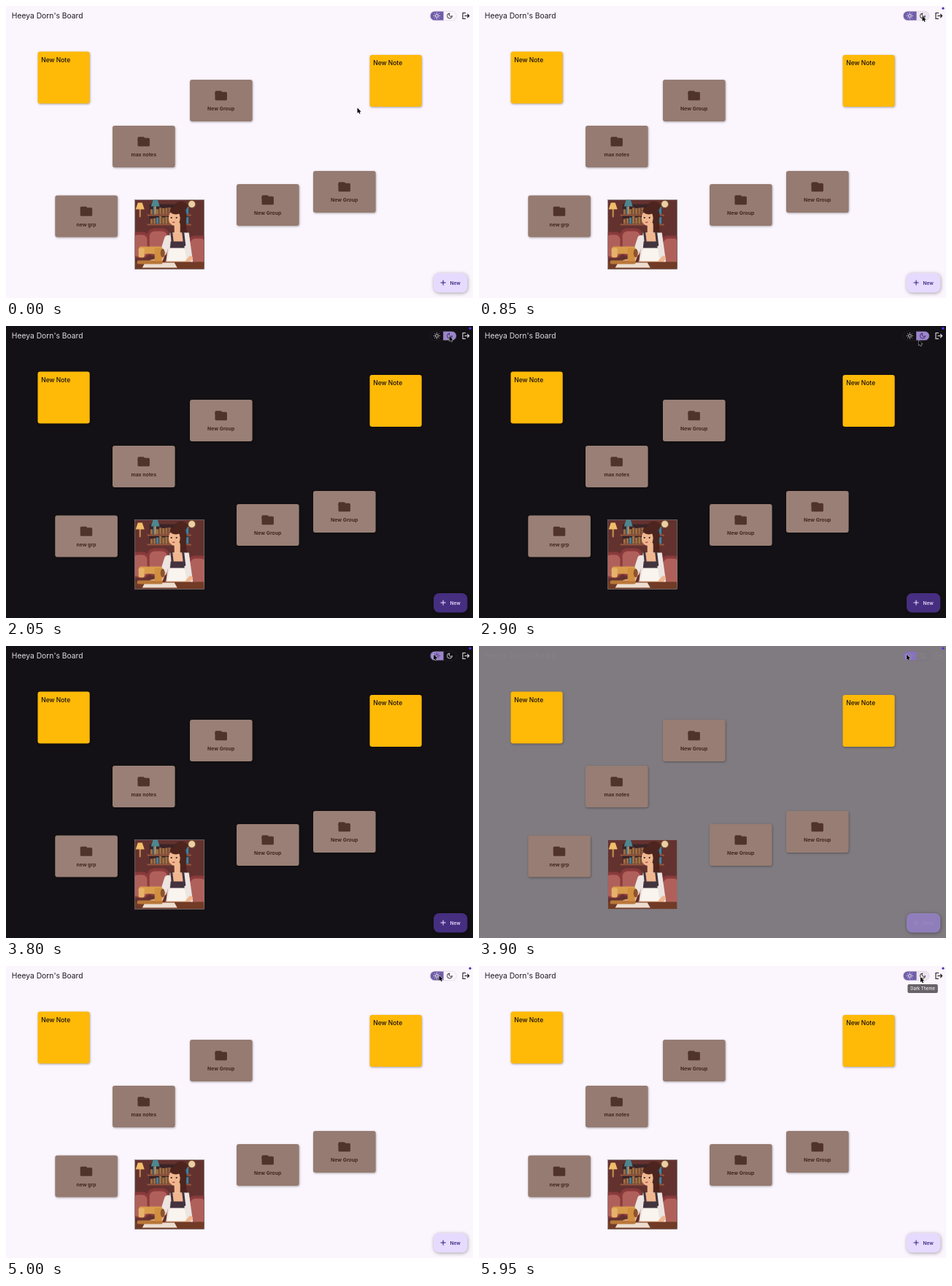
Recreate the animation shown at these times as an HTML page with a canvas. Size 640x400 px, loop 6350 ms.

```html
<!DOCTYPE html>
<html lang="en">
<head>
<meta charset="utf-8">
<title>Notes board</title>
<style>
html, body { margin: 0; width: 100%; height: 100%; overflow: hidden; background: #fbf5fd; }
canvas { display: block; width: 640px; height: 400px; }
</style>
</head>
<body>
<canvas id="stage"></canvas>
<script>
const LOOP = 6350;
const FONT = 'Inter, Roboto, sans-serif';
const canvas = document.getElementById('stage');
const dpr = window.devicePixelRatio || 1;
canvas.width = 640 * dpr;
canvas.height = 400 * dpr;
const ctx = canvas.getContext('2d');

// light and dark value of every themed colour
const THEME = {
  bg: ['#fbf5fd', '#131115'],
  text: ['#1d1b20', '#e0dbe0'],
  card: ['#957b71', '#997f75'],
  fab: ['#e6dbff', '#462e80'],
  fabText: ['#3c2c82', '#e4d7fa'],
  pick: ['#705daa', '#a08ad4'],
  onPick: ['#ffffff', '#342060'],
  line: ['#dad1e1', '#26232a'],
  frame: ['#6e6970', '#918c92'],
  dot: ['#4c34aa', '#483afa']
};
const GROUPS = [
  [252, 101, 'New Group'], [146, 164, 'max notes'], [421, 226, 'New Group'],
  [316, 244, 'New Group'], [67.3, 259.5, 'new grp']
];
const NOTES = [[43.5, 62.5], [498.5, 67]];

// pointer moves: start time, end time, goal
const HOME = [481.5, 139.5];
const MOVES = [
  [450, 850, 607.5, 13.5], [2450, 3100, 601, 21],
  [3100, 3400, 586, 11.7], [4700, 5400, 605, 15]
];

const clamp = v => Math.max(0, Math.min(1, v));
const ease = v => v * v * (3 - 2 * v);
const ramp = (t, start, length) => clamp((t - start) / length);
const mix = (a, b, k) => a + (b - a) * k;
const rnd = i => Math.abs(Math.sin(i * 12.9898) * 43758.5453) % 1;
const darkness = t => ramp(t, 1808, 200) - ramp(t, 3808, 200);

function mixHex(a, b, k) {
  const part = (hex, i) => parseInt(hex.slice(i, i + 2), 16);
  return `rgb(${[1, 3, 5].map(i => Math.round(mix(part(a, i), part(b, i), k)))})`;
}

function palette(k) {
  const out = {};
  for (const name in THEME) out[name] = mixHex(...THEME[name], k);
  return out;
}

function pointer(t) {
  let [x, y] = HOME;
  for (const [from, to, gx, gy] of MOVES) {
    const k = ease(ramp(t, from, to - from));
    x = mix(x, gx, k);
    y = mix(y, gy, k);
  }
  return [x, y];
}

function box(x, y, w, h, r, color) {
  ctx.fillStyle = color;
  ctx.beginPath();
  ctx.roundRect(x, y, w, h, r);
  ctx.fill();
}

function raised(x, y, w, h, r, color, blur) {
  ctx.save();
  ctx.shadowColor = 'rgba(0,0,0,.34)';
  ctx.shadowBlur = blur * dpr;
  ctx.shadowOffsetX = 0.6 * dpr;
  ctx.shadowOffsetY = dpr;
  box(x, y, w, h, r, color);
  ctx.restore();
}

function oval(x, y, rx, ry, color) {
  ctx.fillStyle = color;
  ctx.beginPath();
  ctx.ellipse(x, y, rx, ry, 0, 0, 7);
  ctx.fill();
}

function stroke(color, width, ...p) {
  ctx.strokeStyle = color;
  ctx.lineWidth = width;
  ctx.beginPath();
  for (let i = 0; i < p.length; i += 2) ctx.lineTo(p[i], p[i + 1]);
  ctx.stroke();
}

// upright trapezoid around a centre line
function taper(x, y, top, bottom, h, color) {
  ctx.fillStyle = color;
  ctx.beginPath();
  ctx.moveTo(x - top, y);
  ctx.lineTo(x + top, y);
  ctx.lineTo(x + bottom, y + h);
  ctx.lineTo(x - bottom, y + h);
  ctx.fill();
}

function label(str, x, y, size, weight, color, align = 'left') {
  ctx.font = `${weight} ${size}px ${FONT}`;
  ctx.textAlign = align;
  ctx.fillStyle = color;
  ctx.fillText(str, x, y);
}

function folder(x, y) {
  box(x - 8.2, y - 6.5, 8.2, 6, 1.6, '#50342c');
  taper(x - 0.4, y - 6.4, 0.4, 2, 1.8, '#50342c');
  box(x - 8.2, y - 4.9, 16.4, 11.5, 1.6, '#50342c');
}

function group(x, y, name, c) {
  raised(x, y, 85.6, 57, 3, c.card, 3);
  folder(x + 42.7, y + 21.7);
  label(name, x + 42.7, y + 42.3, 6.85, 700, '#402820', 'center');
}

function note(x, y) {
  raised(x, y, 71.2, 71, 3.2, '#ffb907', 3);
  label('New Note', x + 4.7, y + 14.2, 8.5, 500, '#15100a');
}

function chair(x, y, w, h) {
  box(x, y, w, h, 9, '#8a3a3b');
  box(x + 3, y + 4, w - 6, h - 6, 7, '#b0605a');
}

function lamp(x, y, shade) {
  box(x - 1, y, 2, 20, 1, '#c9924e');
  taper(x, y, 3, 6, 9, shade);
}

function room() {
  box(0, 0, 95, 95, 0, '#63322f');
  box(20, 6, 54, 29, 0, '#3a2428');
  for (let i = 0; i < 26; i++) {
    const h = 7 + rnd(i) * 4;
    const hue = rnd(i + 40) < 0.25 ? 200 : 8 + rnd(i + 80) * 24;
    box(21 + i % 13 * 4.1, (i < 13 ? 20 : 33) - h, 3.4, h, 0, `hsl(${hue},40%,44%)`);
  }
  for (const y of [20, 33]) box(17, y, 60, 2, 0, '#9a583f');
  lamp(7, 4, '#f0bd68');
  lamp(28, 0, '#4d8790');
  oval(78, 6, 6, 6, '#704027');
  oval(78, 6, 4.6, 4.6, '#e9cfa4');
  chair(-6, 44, 26, 36);
  chair(17, 39, 30, 38);
  chair(73, 49, 27, 43);
}

function woman() {
  const hair = '#4d251e', skin = '#f0b78f', cloth = '#ece5e2';
  oval(63, 9, 9, 7, hair);
  oval(59, 22, 12, 13, hair);
  stroke(hair, 8, 66, 24, 67, 44);
  stroke(skin, 8, 58, 34, 58, 46);
  oval(54, 25, 8, 10.5, skin);
  oval(56, 15, 8, 5, hair);
  for (const x of [50, 57]) oval(x, 24.5, 1.2, 1, '#382321');
  oval(53, 31, 2, 0.8, '#b9524b');
  taper(61, 45, 13, 19, 44, cloth);
  taper(58, 45, 8, 9, 14, skin);
  for (const x of [50, 66]) stroke('#43333e', 3, x, 45, x + 2, 62);
  taper(58, 57, 9, 10, 10, '#43333e');
  taper(58, 66, 10, 14, 23, '#faf4ef');
  stroke(cloth, 9, 45, 53, 39, 72);
  stroke(skin, 6, 39, 73, 35, 83, 23, 85);
  stroke(skin, 6, 76, 80, 70, 87, 44, 87);
}

function machine() {
  box(0, 85, 95, 10, 0, '#713b26');
  taper(34, 86, 20, 24, 7, '#ecddd0');
  box(3, 83, 35, 5, 2, '#b9773a');
  box(5, 64, 33, 10, 4, '#d99c4d');
  box(27, 66, 10, 18, 2, '#d19040');
  box(5, 66, 8, 13, 2, '#e6b269');
  oval(38, 73, 3, 6, '#8b542e');
}

function picture(c) {
  ctx.save();
  ctx.translate(176.7, 265.4);
  ctx.beginPath();
  ctx.rect(0, 0, 95, 95);
  ctx.clip();
  ctx.lineCap = ctx.lineJoin = 'round';
  room();
  woman();
  machine();
  ctx.restore();
  ctx.strokeStyle = c.frame;
  ctx.lineWidth = 0.6;
  ctx.strokeRect(176.5, 265.4, 95, 95);
}

function sun(x, y, color) {
  ctx.strokeStyle = color;
  ctx.lineWidth = 0.9;
  ctx.beginPath();
  ctx.arc(x, y, 1.9, 0, 7);
  for (let i = 0; i < 8; i++) {
    const a = i * Math.PI / 4, u = Math.cos(a), v = Math.sin(a);
    ctx.moveTo(x + u * 3.1, y + v * 3.1);
    ctx.lineTo(x + u * 4.5, y + v * 4.5);
  }
  ctx.stroke();
}

function moon(x, y, color) {
  ctx.strokeStyle = color;
  ctx.lineWidth = 0.9;
  ctx.beginPath();
  ctx.arc(x, y, 3.5, -Math.PI / 2, 0, true);
  ctx.quadraticCurveTo(x + 1.4, y + 1.8, x - 0.2, y + 0.2);
  ctx.quadraticCurveTo(x - 1.8, y - 1.4, x, y - 3.5);
  ctx.stroke();
}

function toggle(right, mx, c) {
  const mid = 599.2, left = 581.3, w = 36;
  const half = (onRight, color) => box(onRight ? mid : left, 7, 18.3, 13, 0, color);
  ctx.save();
  ctx.beginPath();
  ctx.roundRect(left, 7.2, w, 12.6, 6.3);
  ctx.save();
  ctx.clip();
  half(right, c.pick);
  if (mx > left && mx < left + w) half(mx > mid, 'rgba(110,95,135,.1)');
  ctx.restore();
  ctx.strokeStyle = c.line;
  ctx.lineWidth = 0.6;
  ctx.beginPath();
  ctx.roundRect(left, 7.2, w, 12.6, 6.3);
  ctx.stroke();
  ctx.restore();
  sun(590.4, 13.5, right ? c.text : c.onPick);
  moon(608, 13.5, right ? c.onPick : c.text);
}

function exitIcon(x, y, color) {
  stroke(color, 1.1, x, y - 4, x - 4, y - 4, x - 4, y + 4, x, y + 4);
  stroke(color, 1.1, x - 1.5, y, x + 4.3, y);
  stroke(color, 1.1, x + 2.2, y - 2.5, x + 4.7, y, x + 2.2, y + 2.5);
}

function newButton(c) {
  raised(586, 366, 46.3, 26.4, 7.5, c.fab, 5);
  box(595.6, 378.45, 7, 1.1, 0, c.fabText);
  box(598.55, 375.5, 1.1, 7, 0, c.fabText);
  label('New', 608.4, 381.5, 6.6, 600, c.fabText);
}

function tooltip(alpha) {
  ctx.globalAlpha = alpha;
  box(587.4, 25, 41.4, 12, 2, '#676369');
  label('Dark Theme', 608.1, 33.1, 5.85, 400, '#fff', 'center');
  ctx.globalAlpha = 1;
}

const arrow = new Path2D('M0 0V7.2L1.7 5.7 2.8 8.3 4.1 7.7 3 5.2H5.2Z');

function cursor(x, y) {
  ctx.save();
  ctx.translate(x, y);
  ctx.strokeStyle = '#fff';
  ctx.lineWidth = 0.8;
  ctx.stroke(arrow);
  ctx.fillStyle = '#000';
  ctx.fill(arrow);
  ctx.restore();
}

function draw(t) {
  const c = palette(darkness(t));
  const [mx, my] = pointer(t);
  ctx.setTransform(dpr, 0, 0, dpr, 0, 0);
  box(0, 0, 640, 400, 0, c.bg);
  label("Heeya Dorn's Board", 7.8, 17.3, 10.3, 400, c.text);
  toggle(t >= 1780 && t < 3780, mx, c);
  exitIcon(630, 13.5, c.text);
  for (const [x, y] of NOTES) note(x, y);
  for (const [x, y, name] of GROUPS) group(x, y, name, c);
  picture(c);
  newButton(c);
  tooltip(ramp(t, 5330, 200));
  if (t >= 50) oval(636, 3.2, 1.6, 1.6, c.dot);
  cursor(mx, my);
}

const start = performance.now();
function tick() {
  draw((performance.now() - start) % LOOP);
  requestAnimationFrame(tick);
}
tick();
</script>
</body>
</html>
```
